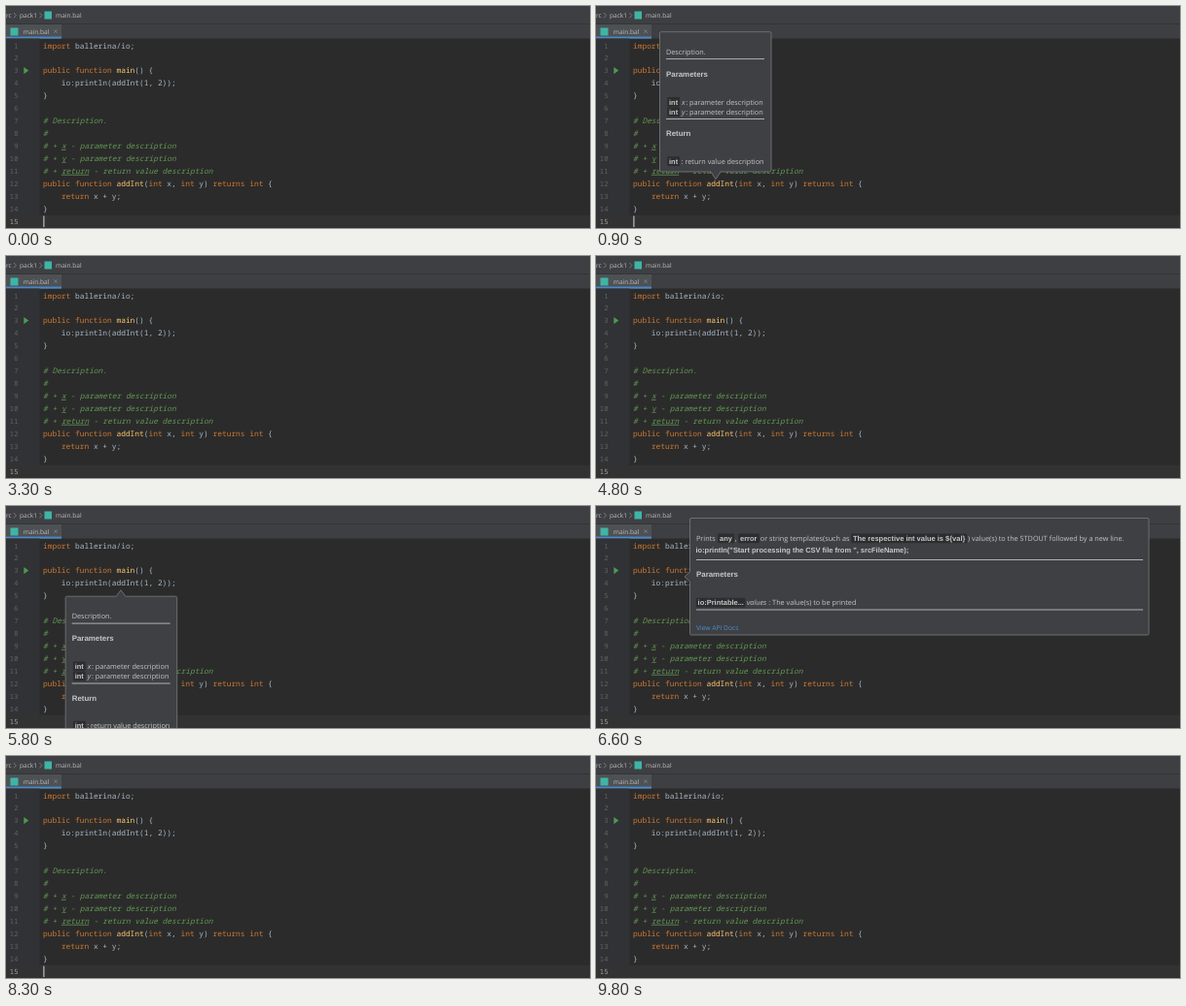
These frames come from a looping animation (600x229 px, 10000 ms). An HTML page:

```html
<!DOCTYPE html>
<html lang="en">
<head>
<meta charset="utf-8">
<title>Editor hover documentation</title>
<style>
html, body { margin: 0; width: 100%; height: 100%; overflow: hidden; background: #2b2b2b; }
svg { display: block; }
text { white-space: pre; text-rendering: geometricPrecision; fill: #c6c6c6; font: 500 7.28px "Open Sans", "Noto Sans", sans-serif; }
.code { font: 7.87px "Noto Sans Mono", monospace; fill: #a9b7c6; }
.num { font: 7.2px "Noto Sans Mono", monospace; fill: #606366; text-anchor: end; }
.current { fill: #a4a3a3; }
.key { fill: #cc7832; }
.name { fill: #ffc66d; }
.doc { fill: #629755; font-style: italic; }
.tag { font-weight: 500; text-decoration: underline; }
.ui { font-size: 6.6px; fill: #bbb; }
.head { font: bold 7.9px "Liberation Sans", Arial, sans-serif; }
.mono { font: bold 7.47px "Liberation Sans", Arial, sans-serif; }
.link { font-size: 6.7px; fill: #4a90d0; }
.it { font-style: italic; }
.balloon { fill: #3f4044; stroke: #737477; stroke-width: .9; }
.rule { stroke: #b0b0b2; stroke-width: 1; }
.chev { fill: none; stroke: #85868a; stroke-width: .8; }
</style>
</head>
<body>
<svg id="stage" width="600" height="229" viewBox="0 0 600 229"></svg>
<script>
const LINE = 12.93, TOP = 33.5;

const rect = (x, y, w, h, fill, r = 0) => `<rect x="${x}" y="${y}" width="${w}" height="${h}" rx="${r}" fill="${fill}"/>`;
const text = (x, y, s, cls = '') => `<text x="${x}" y="${y}" class="${cls}">${s}</text>`;
const span = cls => s => `<tspan class="${cls}">${s}</tspan>`;
const rule = (x1, x2, y) => `<path class="rule" d="M${x1} ${y}H${x2}"/>`;
const chip = (x, y, w, s) => rect(x - 1.8, y - 7.5, w + 3.6, 9.8, '#2d2d2f', 1) + text(x, y, s, 'mono');
const chevron = x => `<path class="chev" d="M${x} 7l2.4 2.7l-2.4 2.7"/>`;
const [key, name, doc, tag] = ['key', 'name', 'doc', 'tag'].map(span);

const source = [
  key('import') + ' ballerina/io;',
  '',
  key('public function ') + name('main') + '() {',
  '    io:println(addInt(1, 2));',
  '}',
  '',
  doc('# Description.'),
  doc('#'),
  doc(`# + ${tag('x')} - parameter description`),
  doc(`# + ${tag('y')} - parameter description`),
  doc(`# + ${tag('return')} - return value description`),
  `${key('public function ')}${name('addInt')}(${key('int')} x, ${key('int')} y) ${key('returns int')} {`,
  `    ${key('return')} x + y;`,
  '}',
  ''
];

const editor = rect(0, 0, 600, TOP, '#3e3f43') + rect(0, 18.2, 600, .8, '#303134')
  + rect(0, 19, 57, TOP - 19, '#4e5154') + rect(0, 31.6, 57, 2, '#4a88c7')
  + text(-3.2, 12, 'src', 'ui') + chevron(8) + text(14, 12, 'pack1', 'ui') + chevron(34.5)
  + rect(39.5, 5.5, 7.5, 8, '#3fb5a5') + text(51, 12, 'main.bal', 'ui')
  + rect(4.5, 22.5, 8, 8, '#3fb5a5') + text(17.8, 29, 'main.bal', 'ui')
  + '<path class="chev" d="M49.3 24.5l3.4 3.4m0-3.4l-3.4 3.4"/>'
  + rect(0, TOP, 34.5, 200, '#313235')
  + rect(0, 215.9, 600, LINE, '#323232')
  + '<path fill="#499c54" d="M18.3 63l5 3.6l-5 3.6z"/>'
  + source.map((s, i) => {
      const y = 43.5 + i * LINE;
      return text(12.5, y, i + 1, i == 14 ? 'num current' : 'num') + text(38, y, s, 'code');
    }).join('');

const param = (y, id) => chip(75, y, 9.2, 'int')
  + text(88, y, `<tspan class="it">${id}</tspan>`) + text(92.2, y, ': parameter description');

// Documentation of addInt, drawn with its arrow below or above.
const addIntDoc = arrow => `<path class="balloon" d="M67 26.7H${arrow == 'up' ? '117.5l4.8 -6.5l4.8 6.5H' : ''}178.5q1.5 0 1.5 1.5V169.5q0 1.5 -1.5 1.5H${arrow == 'down' ? '128l-5 7.8l-5 -7.8H' : ''}67q-1.5 0 -1.5 -1.5V28.2q0 -1.5 1.5 -1.5z"/>`
  + text(72, 49.7, 'Description.') + rule(72, 173, 54.6)
  + text(72, 72.7, 'Parameters', 'head') + param(101.5, 'x') + param(111.7, 'y') + rule(72, 173, 116.5)
  + text(72, 134, 'Return', 'head') + chip(75, 162.7, 9.2, 'int') + text(87.6, 162.7, ': return value description');

const printlnDoc = '<path class="balloon" d="M98 12.5H566.5q1.5 0 1.5 1.5V131.5q0 1.5 -1.5 1.5H98q-1.5 0 -1.5 -1.5V78l-5.5 -5l5.5 -5V14q0 -1.5 1.5 -1.5z"/>'
  + text(103, 36, 'Prints') + chip(127, 36, 13.2, 'any') + text(142.8, 36, ',')
  + chip(148, 36, 18, 'error') + text(168.8, 36, 'or string templates(such as')
  + chip(264, 36, 115.4, 'The respective int value is ${val}')
  + text(382, 36, ') value(s) to the STDOUT followed by a new line.')
  + text(102.5, 48, 'io:println("Start processing the CSV file from ", srcFileName);', 'mono')
  + rule(103, 562, 55.5) + text(103, 73.3, 'Parameters', 'head')
  + chip(104.6, 102.3, 47, 'io:Printable...') + text(155, 102.3, 'values', 'it')
  + text(177.3, 102.3, ': The value(s) to be printed')
  + rule(103, 562, 107) + text(103, 127.7, 'View API Docs', 'link');

const stage = document.getElementById('stage');
stage.innerHTML = editor
  + `<g id="caret">${rect(38.3, 216.5, 1.2, 11.5, '#bbb')}</g>`
  + `<g class="popup">${addIntDoc('down')}</g>`
  + `<g class="popup"><g transform="translate(-4.3 66.5)">${addIntDoc('up')}</g></g>`
  + `<g class="popup">${printlnDoc}</g>`;

const caret = document.getElementById('caret');
const popups = [...document.querySelectorAll('.popup')];
const shown = [[600, 2000], [5000, 6100], [6300, 8300]];

function draw() {
  const t = Math.floor(performance.now() % 10000 / 100) * 100;
  caret.style.opacity = Math.abs(Math.floor((t - 180) / 517)) % 2;
  popups.forEach((p, i) => {
    const [start, end] = shown[i];
    p.style.opacity = Math.max(0, Math.min(1, (t - start + 100) / 200, (end - t) / 200));
  });
  requestAnimationFrame(draw);
}
draw();
</script>
</body>
</html>
```
